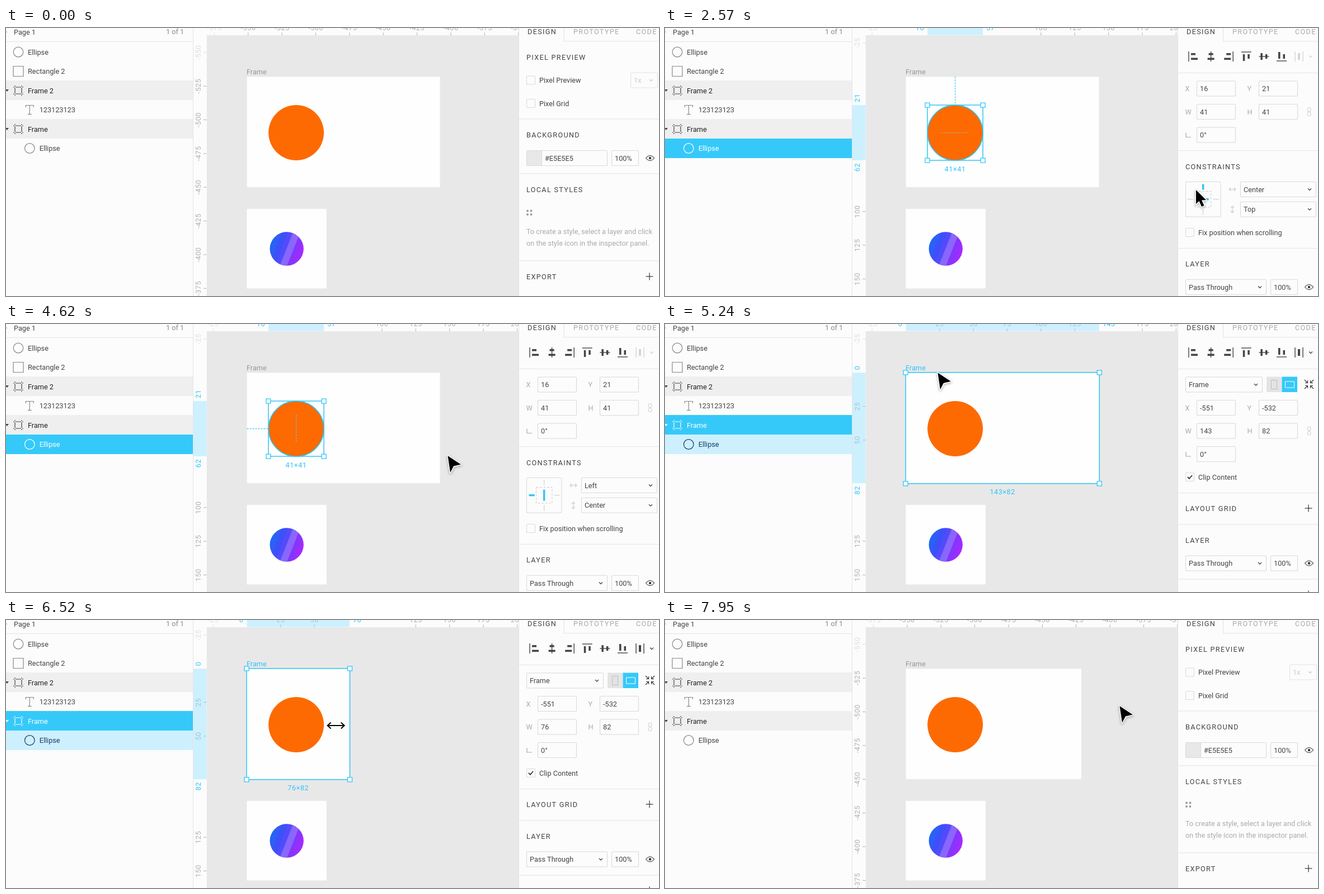
Write an HTML page with a canvas that moves like this. It is 1167x480 px and loops after 8 s.

```html
<!DOCTYPE html>
<html lang="en">
<head>
<meta charset="utf-8">
<title>Constraints demo</title>
<style>
html, body { margin: 0; width: 100%; height: 100%; overflow: hidden; background: #fcfcfc; }
canvas { display: block; }
</style>
</head>
<body>
<canvas id="stage" width="1167" height="480"></canvas>
<script>
const c = document.getElementById('stage').getContext('2d');
const LOOP = 8000, UNIT = 2.415, LEFT = 430.4, TOP = 87.2, BOTTOM = 285.3;
const BLUE = '#30c5f7', ROW_BLUE = '#35c9f9', PALE = '#cdf0ff', CANVAS = '#e8e8e9', WHITE = '#fefefe';
const INK = '#444', GREY = '#aaa', LINE = '#e4e4e5', BORDER = '#dadadb', ORANGE = '#fd6a02';

// Pointer moves: start, end, target x, target y; it rests in between
const moves = [
  [240, 480, 664, 376], [620, 900, 519, 161], [1240, 1330, 526, 167],
  [1470, 1480, 572, 167], [1480, 2000, 960, 288],
  [2190, 2570, 948, 289], [2570, 2950, 937, 305], [3000, 3240, 957, 316],
  [4240, 4620, 788, 234], [4720, 5000, 452, 74], [5150, 5620, 798, 190],
  [5760, 5950, 776, 189], [6070, 6190, 900, 189], [6240, 6600, 546, 189], [6600, 6930, 743.5, 189],
  [6950, 7330, 785, 178], [7480, 7950, 811, 152]
];
const ease = k => k * k * (3 - 2 * k);

function pointer(t) {
  let x = 575, y = 484;
  for (const [start, end, tx, ty] of moves) {
    if (t <= start) break;
    const e = ease(Math.min(1, (t - start) / (end - start)));
    x += (tx - x) * e;
    y += (ty - y) * e;
  }
  return [x, y];
}

// The dragged edge trails the pointer slightly until release
function frameWidth(t) {
  if (t < 6000) return 143;
  return Math.round((pointer(Math.min(t - 22, 6940))[0] - LEFT) / UNIT);
}

// Drawing helpers
function text(s, x, y, color = INK, align = 'left', spacing = 0) {
  c.font = '12.7px Roboto, sans-serif';
  c.letterSpacing = spacing + 'px';
  c.textAlign = align;
  c.fillStyle = color;
  c.fillText(s, x, y + 4.5);
}
const heading = (s, y, x = 930, color = INK) => text(s, x, y, color, 'left', 1.3);
function fill(x, y, w, h, color) { c.fillStyle = color; c.fillRect(x, y, w, h); }
function stroke(color, width = 1, dash = []) {
  c.strokeStyle = color; c.lineWidth = width; c.setLineDash(dash); c.stroke(); c.setLineDash([]);
}
function trace(points, dx = 0, dy = 0) {
  for (let i = 0; i < points.length; i += 2) c[i ? 'lineTo' : 'moveTo'](points[i] + dx, points[i + 1] + dy);
}
function line(points, color, width = 1.2, dash) { c.beginPath(); trace(points); stroke(color, width, dash); }
function shape(points, dx, dy, color) {
  c.beginPath(); trace(points, dx, dy); c.closePath(); c.fillStyle = color; c.fill();
}
function rect(x, y, w, h, color, width = 1, bg, r = 0) {
  c.beginPath(); c.roundRect(x, y, w, h, r);
  if (bg) { c.fillStyle = bg; c.fill(); }
  stroke(color, width);
}
function disc(x, y, r, color) { c.beginPath(); c.arc(x, y, r, 0, 7); c.fillStyle = color; c.fill(); }
function ring(x, y, r, color, width = 1.2) { c.beginPath(); c.arc(x, y, r, 0, 7); stroke(color, width); }
function local(x, y, angle, paint) { c.save(); c.translate(x, y); c.rotate(angle); paint(); c.restore(); }
const quarter = Math.PI / 2;

// Widgets
const rule = y => fill(917, y - .5, 250, 1, LINE);
const box = (x, y, w, color = BORDER) => rect(x + .5, y - 13.5, w, 27, color, 1.1, null, 2);
const chevron = (x, y, color = '#555') => line([x - 3, y - 1.5, x, y + 1.5, x + 3, y - 1.5], color, 1.3);
function plus(x, y) { line([x - 6.5, y, x + 6.5, y], '#333'); line([x, y - 6.5, x, y + 6.5], '#333'); }
function field(s, x, y, w = 69) { box(x, y, w); text(s, x + 6, y); }
function select(s, x, y, w, color = INK, edge = BORDER) {
  box(x, y, w, edge); text(s, x + 6, y, color); chevron(x + w - 11, y, color);
}
function checkbox(s, y, on) {
  rect(930.5, y - 7.5, 15, 15, BORDER, 1.1, null, 2);
  if (on) line([934, y, 937, y + 3, 942, y - 3], '#333', 1.8);
  text(s, 953, y);
}
function eye(x, y, color = '#333') {
  c.beginPath(); c.moveTo(x - 7.5, y);
  for (const s of [1, -1]) c.quadraticCurveTo(x, y - 9 * s, x + 7.5 * s, y);
  stroke(color, 1.1);
  disc(x, y, 2.2, color);
}
function padlock(x, y, color) {
  fill(x - 5, y, 8.5, 6.5, color);
  c.beginPath(); c.moveTo(x, y); c.arc(x + 2.5, y - 3, 2.5, Math.PI, 0); stroke(color, 1.3);
}
function doubleArrow(r, head, spread, color, width) {
  line([-r, 0, r, 0], color, width);
  for (const s of [-1, 1]) line([s * (r - head), -spread, s * r, 0, s * (r - head), spread], color, width);
}

// Layers panel
const layerIcons = {
  circle: (x, y, color) => ring(x, y, 8.8, color),
  rect: (x, y, color) => rect(x - 9, y - 9, 18, 18, color, 1.2),
  text(x, y, color) {
    line([x - 7, y - 4.5, x - 7, y - 8, x + 7, y - 8, x + 7, y - 4.5], color);
    line([x, y - 8, x, y + 8], color);
    line([x - 3.5, y + 8, x + 3.5, y + 8], color);
  },
  frame(x, y, color) {
    for (const d of [-6, 6]) {
      line([x + d, y - 9, x + d, y + 9], color, 1.2, [2, 2, 10, 2]);
      line([x - 9, y + d, x + 9, y + d], color, 1.2, [2, 2, 10, 2]);
    }
    shape([-23, -2, -17, -2, -20, 2], x, y, color);
  }
};
const layerRows = [
  ['circle', 'Ellipse'], ['rect', 'Rectangle 2'], ['frame', 'Frame 2'],
  ['text', '123123123', 1], ['frame', 'Frame'], ['circle', 'Ellipse', 1]
];
function layers({ sel, hover }) {
  fill(0, 0, 334, 480, '#fcfcfc');
  text('Page 1', 14, 7); text('1 of 1', 286, 6, '#888');
  shape([0, 4, 3, 7, 0, 10], 0, 0, '#ddd');
  fill(0, 24, 334, 1, LINE);
  layerRows.forEach(([icon, name, depth = 0], i) => {
    const y = 43 + 34.5 * i, group = icon === 'frame';
    const selected = sel === 'frame' && i === 4 || sel === 'ellipse' && i === 5;
    const inside = sel === 'frame' && i === 5;
    const bg = selected ? ROW_BLUE : inside ? PALE : group && '#efeff0';
    if (bg) fill(0, Math.floor(y - 17.5), 334, 35, bg);
    const tint = selected ? '#fff' : inside && '#153a66';
    layerIcons[icon](22 + 20.3 * depth, y, tint || (group ? '#444' : '#888'));
    text(name, 39 + 20.7 * depth, y, tint || (group ? '#222' : INK));
  });
  if (!hover) return;
  const icon = sel ? '#fff' : '#555';
  if (!sel) rect(.5, 198.5, 333, 33.5, BLUE);
  padlock(289.5, 215, icon); eye(310, 215.5, icon);
}

// Rulers: each axis is drawn along x, the vertical one turned by a quarter
function ruler({ origin, start, length, span, first, gap, fade, at }) {
  const pos = u => start + (u - origin) * UNIT;
  const [from, to] = span || [];
  if (span) {
    at(pos(from), (_, band) => band(pos(to) - pos(from)));
    at(pos(from) - gap, put => put(from, BLUE, 'before'));
    at(pos(to) + gap, put => put(to, BLUE, 'after'));
  }
  for (let u = -600; u <= 250; u += 25) {
    const p = pos(u);
    if (p < first || p > length) continue;
    if (span && Math.min(Math.abs(pos(from) - 12 - p), Math.abs(pos(to) + 14 - p)) < 44) continue;
    const color = p < fade ? '#dedede' : span && u > from && u < to ? '#a5c5d2' : '#b0b0b0';
    at(p, (put, _, tick) => { put(u, color); tick(color); });
  }
}
function rulers(span) {
  fill(335, 0, 581, 13, '#fcfcfc'); fill(335, 0, 23.5, 480, '#fcfcfc');
  fill(334, 0, 1, 480, LINE);
  const top = (x, paint) => paint(
    (s, color, side) => text(s, x, -1, color, { before: 'right', after: 'left' }[side] || 'center', .5),
    w => fill(x, 0, w, 12.5, PALE),
    color => fill(x - .5, 8, 1, 5, color));
  const side = (y, paint) => paint(
    (s, color, where) => local(343.5, y, -quarter,
      () => text(s, 0, 0, color, { before: 'left', after: 'right' }[where] || 'center', .5)),
    h => fill(335, y, 23.5, h, PALE),
    color => fill(353, y - .5, 5.5, 1, color));
  ruler({ origin: span ? 0 : -551, start: LEFT, length: 930, first: 360, gap: 6, fade: 400,
    span: span && [span[0], span[2]], at: top });
  ruler({ origin: span ? 0 : -532, start: TOP, length: 500, first: 15, gap: 5, fade: 50,
    span: span && [span[1], span[3]], at: side });
}

// Canvas
function selection(x0, y0, x1, y1, label) {
  rect(x0, y0, x1 - x0, y1 - y0, BLUE, 1.5);
  for (const x of [x0, x1]) for (const y of [y0, y1]) rect(x - 4, y - 4, 8, 8, BLUE, 1.3, '#fff');
  text(label, (x0 + x1) / 2, y1 + 15, BLUE, 'center', .5);
}
function gradientBall(x, y, r) {
  const g = c.createLinearGradient(x - r, y - 11, x + r, y + 11);
  g.addColorStop(0, '#1a6af4'); g.addColorStop(.45, '#5649fb'); g.addColorStop(1, '#b024ff');
  c.save();
  disc(x, y, r, g); c.clip();
  line([x + 18, y - r, x - 6, y + r], 'rgba(255,255,255,.2)', 12);
  line([x - 3, y - r, x - 27, y + r], 'rgba(50,70,250,.3)', 10);
  c.restore();
}
function artboards(s) {
  fill(358.5, 13, 557.5, 467, CANVAS);
  const width = s.width * UNIT, right = LEFT + width, height = BOTTOM - TOP;
  const cx = 518.6, cy = 187.6, r = 49.5;
  text('Frame', 430, 78, s.sel === 'frame' || s.hoverFrame ? BLUE : '#999');
  c.save();
  c.beginPath(); c.rect(LEFT, TOP, width, height); c.clip();
  fill(LEFT, TOP, width, height, WHITE);
  disc(cx, cy, r, ORANGE);
  c.restore();
  fill(LEFT, 324, 142.5, 142.5, WHITE);
  gradientBall(501.7, 395.5, 30.2);

  if (s.sel === 'ellipse' || s.hover) ring(cx, cy, r, BLUE, 1.6);
  if (s.hoverFrame && !s.sel) rect(LEFT, TOP, width, height, BLUE, 1.5);
  if (s.sel === 'frame') selection(LEFT - .4, TOP - .4, right + .6, BOTTOM + .5, s.width + '×82');
  if (s.sel !== 'ellipse') return;
  const dash = [3, 2];
  if (s.top) line([cx, TOP, cx, cy - r], BLUE, 1.2, dash);
  else line([cx, cy - r / 2, cx, cy + r / 2], '#7fc0c4', 1.2, dash);
  if (s.left) line([LEFT, cy, cx - r, cy], BLUE, 1.2, dash);
  else line([cx - r / 2, cy, cx + r / 2, cy], '#a9b9a4', 1, dash);
  selection(cx - r - .2, cy - r, cx + r, cy + r, '41×41');
  if (s.hover) { disc(557, cy, 5, '#fff'); ring(557, cy, 5, BLUE, 1.5); }
}

// Inspector
function alignIcon(edge, color) {
  fill(edge * 8 - .7, -9, 1.4, 18, color);
  for (const [y, len] of [[-6, 8], [2.5, 12]]) fill(edge * (4 - len / 2) - len / 2, y, len, 3.5, color);
}
function aligns(dim) {
  for (let i = 0; i < 6; i++) local(944 + 31.6 * i, 51, i > 2 ? quarter : 0, () => alignIcon(i % 3 - 1, '#444'));
  const color = dim ? '#d5d5d5' : '#444';
  for (const x of [-7, 7]) fill(1133 + x - .7, 42, 1.4, 18, color);
  fill(1131, 45, 4, 12, color);
  chevron(1154, 51, color);
}
function geometry(y, values) {
  'XYWH'.split('').forEach((name, i) => {
    const x = i % 2 ? 1061 : 950, cy = y + (i > 1 ? 41.5 : 0);
    text(name, x - 20.5, cy, GREY); field(values[i], x, cy);
  });
  line([931, y + 79, 931, y + 87, 940, y + 87], GREY);
  field('0°', 950, y + 83);
  for (const dy of [-7.5, .5]) rect(1148.5, y + 41.5 + dy, 5.5, 7, '#d2d2d2', 1.1, null, 3);
}
function layerSection(y) {
  heading('LAYER', y);
  select('Pass Through', 930, y + 41.5, 144); field('100%', 1082, y + 41.5, 48); eye(1151, y + 41.5);
}
function constraints({ top, left }) {
  const x = 961.7, y = 306.7;
  heading('CONSTRAINTS', 248);
  rect(x - 31.2, y - 31.2, 62.5, 62.5, BORDER, 1.1, null, 2);
  const h = 14.2;
  line([x - h, y - h, x + h, y - h, x + h, y + h, x - h, y + h, x - h, y - h], '#ccc', 1, [4, 2.5]);
  for (let i = 0; i < 4; i++) local(x, y, i * quarter, () => fill(18, -.6, 10, 1.2, '#d0d0d0'));
  const bar = (pinned, angle) => local(x, y, angle, () => fill(pinned ? -27 : -10, -1.7, pinned ? 10 : 20, 3.4, BLUE));
  bar(left, 0); bar(top, quarter);
  local(1014, 289, 0, () => doubleArrow(6, 3, 3, '#ccc', 1.2));
  local(1014, 325, quarter, () => doubleArrow(6, 3, 3, '#ccc', 1.2));
  select(left ? 'Left' : 'Center', 1028, 289, 135);
  select(top ? 'Top' : 'Center', 1028, 324.7, 135);
  checkbox('Fix position when scrolling', 366);
}
function documentPanel() {
  heading('PIXEL PREVIEW', 52);
  checkbox('Pixel Preview', 93.5); select('1x', 1116, 93.5, 48, '#ccc', '#e4e4e4');
  checkbox('Pixel Grid', 135);
  heading('BACKGROUND', 191.5);
  box(930, 233, 144); fill(931, 220, 26, 26, CANVAS); fill(957, 220, 1, 26, BORDER);
  text('#E5E5E5', 963, 233); field('100%', 1082, 233, 48); eye(1151, 233);
  heading('LOCAL STYLES', 289.5);
  for (const x of [932, 938.5]) for (const y of [327.5, 334]) disc(x, y, 1.9, '#999');
  text('To create a style, select a layer and click', 930, 364, GREY);
  text('on the style icon in the inspector panel.', 930, 385, GREY);
  heading('EXPORT', 445); plus(1150, 445);
  [163, 261, 417].forEach(rule);
}
function ellipsePanel(s) {
  aligns(true);
  geometry(108.5, [16, 21, 41, 41]);
  constraints(s);
  layerSection(422.5);
  [80.5, 219.5, 394.5].forEach(rule);
}
function framePanel(s) {
  aligns(false);
  select('Frame', 930, 108.5, 137);
  fill(1075, 94.5, 27.5, 27.5, LINE); fill(1102.5, 94.5, 27.5, 27.5, ROW_BLUE);
  rect(1083.5, 100.5, 10, 16, '#bdbdbd'); rect(1108.5, 103, 16, 11, '#fff');
  for (let i = 0; i < 4; i++) local(1151, 108, i * quarter, () => {
    line([8, 8, 2.5, 2.5], '#333'); line([2.5, 7, 2.5, 2.5, 7, 2.5], '#333');
  });
  geometry(150, [-551, -532, s.width, 82]);
  checkbox('Clip Content', 274, true);
  heading('LAYOUT GRID', 330.5); plus(1150, 330);
  layerSection(387);
  plus(1150, 484);
  [80.5, 302.5, 359, 457].forEach(rule);
}
function inspector(s) {
  fill(916, 0, 251, 480, '#fcfcfc'); fill(916, 0, 1, 480, LINE);
  heading('DESIGN', 6, 932); heading('PROTOTYPE', 6, 1014, GREY); heading('CODE', 6, 1126, GREY);
  line([997.5, 0, 997.5, 23.7, 1167, 23.7], LINE, 1.1);
  ({ '': documentPanel, ellipse: ellipsePanel, frame: framePanel })[s.sel](s);
}

// Pointers
const canvasArrow = [1.5, 2, 25, 17.5, 12, 20.5, 6, 32];
const panelArrow = [1, 1, 1, 26, 6.5, 21, 11, 31, 15.5, 29, 11, 19.5, 19, 19];
function arrow(points, x, y) {
  c.save();
  c.lineJoin = 'round';
  c.shadowColor = 'rgba(0,0,0,.35)'; c.shadowBlur = 4; c.shadowOffsetY = 1.5;
  c.beginPath(); trace(points, x, y); c.closePath(); stroke('#fff', 3);
  c.restore();
  shape(points, x, y, '#000');
}
function resizeArrow(x, y) {
  local(x, y, 0, () => {
    doubleArrow(15, 6, 5.5, '#fff', 4.5);
    doubleArrow(15, 6, 5.5, '#000', 2);
  });
}

function draw(t) {
  const [x, y] = pointer(t);
  const s = {
    sel: t < 1050 ? '' : t < 4720 ? 'ellipse' : t < 5100 ? '' : t < 7530 ? 'frame' : '',
    top: t >= 2240 && t < 4050,
    left: t >= 2940,
    hover: t >= 790 && t < 1500,
    hoverFrame: t >= 4970 && t < 5150,
    width: frameWidth(t)
  };
  c.clearRect(0, 0, 1167, 480);
  artboards(s);
  rulers(s.sel === 'ellipse' ? [16, 21, 57, 62] : s.sel && [0, 0, s.width, 82]);
  layers(s);
  inspector(s);
  const dragging = t > 6000 && t < 6950;
  const onEdge = t > 5700 && s.sel && Math.abs(x - LEFT - s.width * UNIT) < 8;
  if (dragging || onEdge) resizeArrow(x, y);
  else arrow(x > 916 ? panelArrow : canvasArrow, x, y);
}

function tick() {
  draw(performance.now() % LOOP);
  requestAnimationFrame(tick);
}
tick();
</script>
</body>
</html>
```
